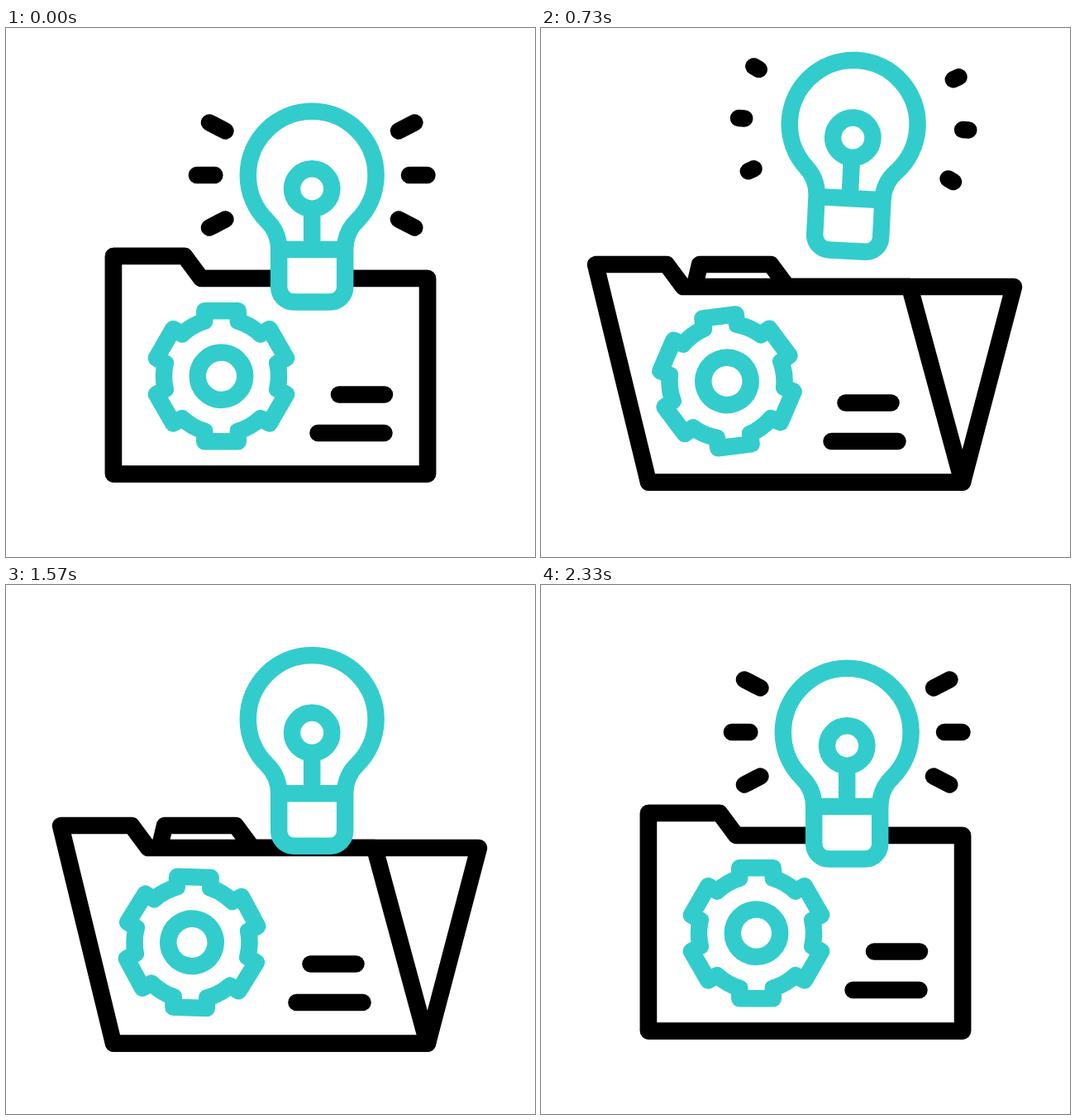
Animation of 640 by 640 pixels, one loop 2370 ms. Source, as an HTML page:

```html
<!DOCTYPE html>
<html lang="en">
<head>
<meta charset="utf-8">
<title>Idea folder</title>
<style>
  html, body { margin: 0; width: 100%; height: 100%; overflow: hidden; background: #fff; }
  svg { display: block; width: 100vw; height: 100vh; }
  .ink, .teal { fill: none; stroke: #000; stroke-width: 20.5; stroke-linecap: round; stroke-linejoin: round; }
  .teal { stroke: #3cc; }
  .fill { fill: #fff; }
  .glow { stroke-width: 23; }
</style>
</head>
<body>
<svg viewBox="0 0 640 640">
  <g id="folder">
    <path id="back" class="ink fill"/>
    <path id="front" class="ink fill"/>
    <g id="gear">
      <path id="teeth" class="teal"/>
      <circle class="teal" r="28.7"/>
    </g>
    <g id="bars"></g>
  </g>
  <g id="bulb">
    <g id="rays"></g>
    <path class="teal fill" d="M330.2 268C330.2 254 325 242 315.4 232.8A77.4 77.4 0 1 1 425 232.8C415.4 242 410.2 254 410.2 268V313.5A18 18 0 0 1 392.2 331.5H348.2A18 18 0 0 1 330.2 313.5Z"/>
    <path class="teal" style="stroke-linecap:butt" d="M330.2 268H410.2M370.2 219V268"/>
    <circle class="teal" cx="370.2" cy="194.5" r="24.2"/>
  </g>
</svg>
<script>
const LOOP = 2370, STEP = 1000 / 30, LAST = 70;
const $ = id => document.getElementById(id);

const clamp = u => Math.min(1, Math.max(0, u));
const ramp = (t, a, b) => clamp((t - a) / (b - a));
const smooth = u => u * u * (3 - 2 * u);

// Eased value from a list of [time, value] keys
function track(keys, t) {
  let [t0, v0] = keys[0];
  for (const [t1, v1] of keys) {
    if (t < t1) return v0 + (v1 - v0) * smooth(ramp(t, t0, t1));
    t0 = t1; v0 = v1;
  }
  return v0;
}

const OPEN = [[265, 0], [597, 1], [1620, 1], [1955, 0]];
const BOUNCE = [[270, 0], [385, -12], [580, 19], [900, 0], [1400, 0], [1635, 19], [1835, -11], [1945, 0]];
const LIFT = [[470, 0], [765, -64], [1070, -52], [1350, -64], [1670, 0]];
const TILT = [[500, 0], [750, 3], [1060, 0], [1250, -3], [1500, 0]];
// Grow start and end, then shrink start and end
const FLASHES = [[-200, 0, 0, 200], [400, 600, 600, 800], [1585, 1735, 1735, 1935], [2130, 2330, 2400, 2600]];

function add(parent, cls) {
  const el = document.createElementNS('http://www.w3.org/2000/svg', 'path');
  el.setAttribute('class', cls);
  $(parent).append(el);
  return el;
}

function drawPart(el, [x0, y0, x1, y1], a, b) {
  const at = u => `${x0 + (x1 - x0) * u} ${y0 + (y1 - y0) * u}`;
  el.setAttribute('d', b > a ? `M${at(a)}L${at(b)}` : '');
}

const sheet = dx =>
  `M${130 + dx} 276H${216 + dx}L${236 + dx} 303H${510 + dx}L510 539.5H130Z`;

function gearPath() {
  const pts = [];
  for (let k = 0; k < 6; k++) {
    const c = Math.cos(k * Math.PI / 3), s = Math.sin(k * Math.PI / 3);
    const p = (x, y) => `${(x * c - y * s).toFixed(2)} ${(x * s + y * c).toFixed(2)}`;
    pts.push(`${k ? 'A69.5 69.5 0 0 1 ' : 'M'}${p(-20.3, -66.5)}L${p(-20.3, -79)}L${p(20.3, -79)}L${p(20.3, -66.5)}`);
  }
  return pts.join('') + 'A69.5 69.5 0 0 1 -20.3 -66.5';
}
$('teeth').setAttribute('d', gearPath());

const rays = [];
for (const side of [-1, 1]) {
  for (const row of [-1, 0, 1]) {
    const inner = row ? 104.8 : 117.8, outer = row ? 124.2 : 139.3;
    rays.push({
      el: add('rays', 'ink'),
      line: [370.2 + side * inner, 178 + row * 53.5, 370.2 + side * outer, 178 + row * 63.5]
    });
  }
}

const bars = [
  { line: [403, 443.5, 458, 443.5], slide: -34.5, start: 1590 },
  { line: [377.5, 490, 457.5, 490], slide: -26, start: 1756 }
];
for (const bar of bars) {
  bar.ink = add('bars', 'ink');
  bar.glow = add('bars', 'teal glow');
  drawPart(bar.ink, bar.line, 0, 1);
}

const move = (el, value) => el.setAttribute('transform', value);

function render(t) {
  const open = track(OPEN, t);
  move($('folder'), `translate(0 ${track(BOUNCE, t)})`);
  $('back').setAttribute('d', sheet(62 * open));
  $('front').setAttribute('d', sheet(-64 * open));
  move($('gear'), `translate(${260.5 - 35.5 * open} ${421.3 - 4 * open}) rotate(${360 * t / (LAST * STEP)})`);

  for (const { line, slide, start, ink, glow } of bars) {
    const shift = `translate(${slide * open} 0)`;
    move(ink, shift);
    move(glow, shift);
    drawPart(glow, line, ramp(t, start + 140, start + 342), ramp(t, start, start + 200));
  }

  move($('bulb'), `translate(0 ${track(LIFT, t)}) rotate(${track(TILT, t)} 370.2 332)`);
  const flash = FLASHES.find(f => t >= f[0] && t < f[3]);
  for (const { el, line } of rays) {
    if (flash) drawPart(el, line, ramp(t, flash[2], flash[3]), ramp(t, flash[0], flash[1]));
    else drawPart(el, line, 0, 0);
  }
}

const begin = performance.now();
function tick() {
  const t = (performance.now() - begin) % LOOP;
  render(Math.min(LAST, Math.floor((t + 3.4) / STEP)) * STEP);
  requestAnimationFrame(tick);
}
tick();
</script>
</body>
</html>
```
